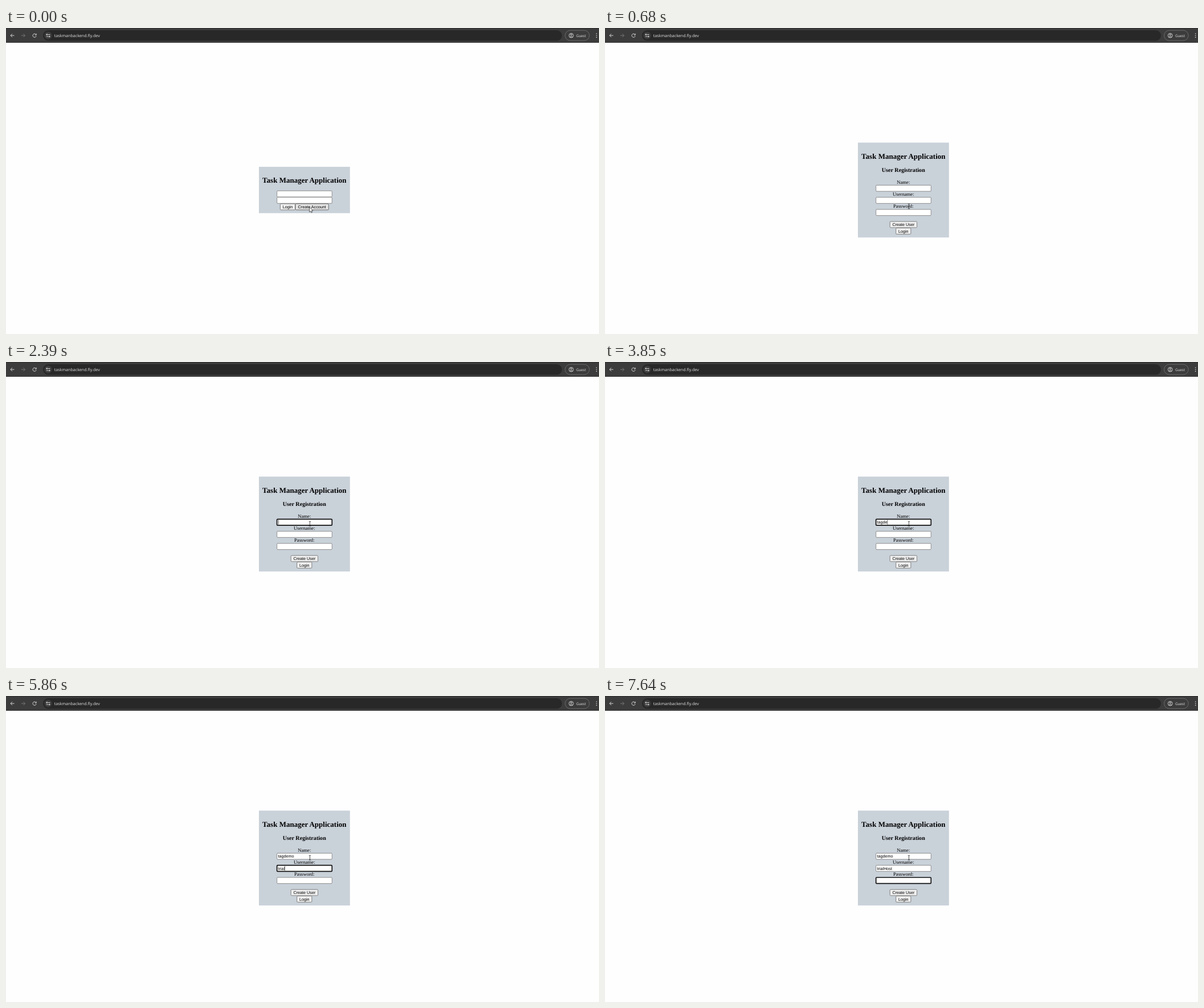
An HTML page that plays this animation: 1041x538 px, repeating every 8000 ms.

```html
<!DOCTYPE html>
<html lang="en">
<head>
<meta charset="utf-8">
<title>Task Manager Application</title>
<style>
html, body { margin: 0; width: 100%; height: 100%; overflow: hidden; background: #fefefe; }
svg { display: block; text-rendering: geometricPrecision; }
.chrome { font-family: "Open Sans", "Noto Sans", sans-serif; fill: #e3e3e3; }
.icon { fill: none; stroke: #d6d6d6; stroke-width: 1; }
.serif { font-family: "Liberation Serif", "Times New Roman", serif; text-anchor: middle; }
.sans { font: 7.23px "Liberation Sans", Arial, sans-serif; }
.box { fill: #fff; stroke: #767676; stroke-width: .8; }
.focus { stroke: #101010; stroke-width: 1.7; }
.button { fill: #efefef; stroke: #6b6b6b; stroke-width: .8; }
.hover { fill: #e5e5e5; stroke: #4f4f4f; }
.pressed { fill: #f5f5f5; stroke: #8d8d8d; }
</style>
</head>
<body>
<svg width="1041" height="538" viewBox="0 0 1041 538">
  <rect width="1041" height="538" fill="#fefefe"/>
  <rect width="1041" height="26" fill="#3c3c3c"/>
  <rect width="1041" height="1" fill="#2d2d2d"/>
  <rect x="65" y="4" width="911" height="18.4" rx="9.2" fill="#282828"/>
  <circle cx="74" cy="13.2" r="6.6" fill="#3c3c3c"/>
  <g class="icon">
    <path d="M14.5 13.2H8M11 10.2l-3 3 3 3"/>
    <path d="M27 13.2h6.5M30.5 10.2l3 3-3 3" stroke="#777"/>
    <path d="M52.6 11.4a3.1 3.1 0 1 0 .5 2.6M53.2 9.8v2.4h-2.4"/>
    <path d="M70.8 11.5h1.2M74 11.5h3.4M70.8 15h3.2M76 15h1.4"/>
    <circle cx="72" cy="11.5" r="1"/>
    <circle cx="76" cy="15" r="1"/>
    <rect x="981.5" y="4.2" width="42.6" height="18" rx="9" stroke="#757575" stroke-width=".8"/>
    <circle cx="992.2" cy="13.2" r="3.9" stroke-width=".9"/>
    <circle cx="992.2" cy="12" r="1.3" stroke-width=".9"/>
    <path d="M989.7 15.9q2.5-1.8 5 0" stroke-width=".9"/>
  </g>
  <g class="chrome">
    <text x="84.8" y="15.9" font-size="7.15">taskmanbackend.fly.dev</text>
    <text x="1000.9" y="15.5" font-size="6.3">Guest</text>
    <circle cx="1036.6" cy="10" r=".8"/>
    <circle cx="1036.6" cy="13.2" r=".8"/>
    <circle cx="1036.6" cy="16.4" r=".8"/>
  </g>
  <g id="login"></g>
  <g id="register"></g>
  <path id="arrow" d="M0 0V8.6L2 6.8 3.4 9.8 4.8 9.2 3.5 6.3H6.2Z" fill="#fff" stroke="#222" stroke-width=".7"/>
  <path id="beam" d="M-1.7-4.2Q0-4.2 0-3.4Q0-4.2 1.7-4.2M0-3.4V3.6M-1.7 4.3Q0 4.3 0 3.5Q0 4.3 1.7 4.3" fill="none" stroke="#222" stroke-width=".8"/>
</svg>
<script>
const LOOP = 8000;
const CENTER = 523.8;
const $ = id => document.getElementById(id);

function add(parent, tag, attrs, text = '') {
  const node = document.createElementNS('http://www.w3.org/2000/svg', tag);
  for (const key in attrs) node.setAttribute(key, attrs[key]);
  node.textContent = text;
  return parent.appendChild(node);
}

const show = (node, on) => node.setAttribute('visibility', on ? 'visible' : 'hidden');
const move = (node, x, y) => node.setAttribute('transform', `translate(${x} ${y})`);

function panel(parent, top, height) {
  add(parent, 'rect', { x: 444, y: top, width: 159.8, height, fill: '#c9d1d9' });
  heading(parent, 'Task Manager Application', top + 28, 13, 'bold');
}

function heading(parent, text, y, size, weight = 'normal') {
  add(parent, 'text', { class: 'serif', x: CENTER, y, 'font-size': size, 'font-weight': weight }, text);
}

function button(parent, text, x, y, width) {
  const rect = add(parent, 'rect', { class: 'button', x, y, width, height: 10.7, rx: 1.4 });
  add(parent, 'text', { class: 'sans', x: x + width / 2, y: y + 7.9, 'text-anchor': 'middle' }, text);
  return rect;
}

function input(parent, y) {
  return {
    y,
    box: add(parent, 'rect', { class: 'box', x: 475.7, y, width: 96.6, height: 10.7, rx: 1.2 }),
    text: add(parent, 'text', { class: 'sans', x: 477.5, y: y + 7.8 }),
    caret: add(parent, 'rect', { y: y + 1.1, width: .7, height: 8.2, fill: '#333' })
  };
}

const login = $('login');
panel(login, 244.1, 81.4);
[286.3, 297.6].forEach(y => show(input(login, y).caret, false) );
button(login, 'Login', 481.4, 309.1, 26.2);
const create = button(login, 'Create Account', 508.1, 309.1, 58.2);

const register = $('register');
panel(register, 201.5, 166.8);
heading(register, 'User Registration', 253, 10.15, 'bold');

// keys: [time, letters typed]; off: spans in which the caret is dark
const fields = [
  { label: 'Name:', value: 'tagdemo', start: 1320, end: 4760,
    keys: [[2520, 1], [2660, 2], [3570, 3], [3700, 4], [3850, 5], [3980, 6], [4110, 7]],
    off: [[1850, 2390], [3180, 3570], [4610, 4760]] },
  { label: 'Username:', value: 'trialHost', start: 4760, end: 7130,
    keys: [[5440, 1], [5590, 3], [5860, 5], [6250, 6], [6500, 8], [6630, 9]],
    off: [[5260, 5440]] },
  { label: 'Password:', value: '', start: 7130, end: LOOP, keys: [], off: [[7640, LOOP]] }
];
fields.forEach((field, i) => {
  const y = 276.4 + i * 21.3;
  heading(register, field.label, y - 2.7, 8.67);
  Object.assign(field, input(register, y));
});
button(register, 'Create User', 500.2, 340.2, 47.4);
button(register, 'Login', 510.7, 351.7, 26.2);

const within = (t, [from, to]) => t >= from && t < to;

function drawField(field, t) {
  const focused = within(t, [field.start, field.end]);
  const count = field.keys.reduce((n, [time, letters]) => t >= time ? letters : n, 0);
  field.text.textContent = field.value.slice(0, count);
  field.box.setAttribute('class', focused ? 'box focus' : 'box');
  const x = count ? 477.5 + field.text.getComputedTextLength() : 478;
  field.caret.setAttribute('x', x);
  field.caret.style.display = focused && !field.off.some(span => within(t, span)) ? '' : 'none';
}

function draw(t) {
  const registering = t >= 680;
  login.style.display = registering ? 'none' : '';
  register.style.display = registering ? '' : 'none';
  create.setAttribute('class', t < 540 ? 'button hover' : 'button pressed');
  show($('arrow'), !registering);
  show($('beam'), registering);
  move($('arrow'), 532.7, t < 130 ? 315 : 313.4);
  move($('beam'), 533.5, t < 800 ? 313.6 : t < 950 ? 307.5 : 284.3);
  fields.forEach(field => drawField(field, t));
}

function tick() {
  draw(performance.now() % LOOP);
  requestAnimationFrame(tick);
}
tick();
</script>
</body>
</html>
```
